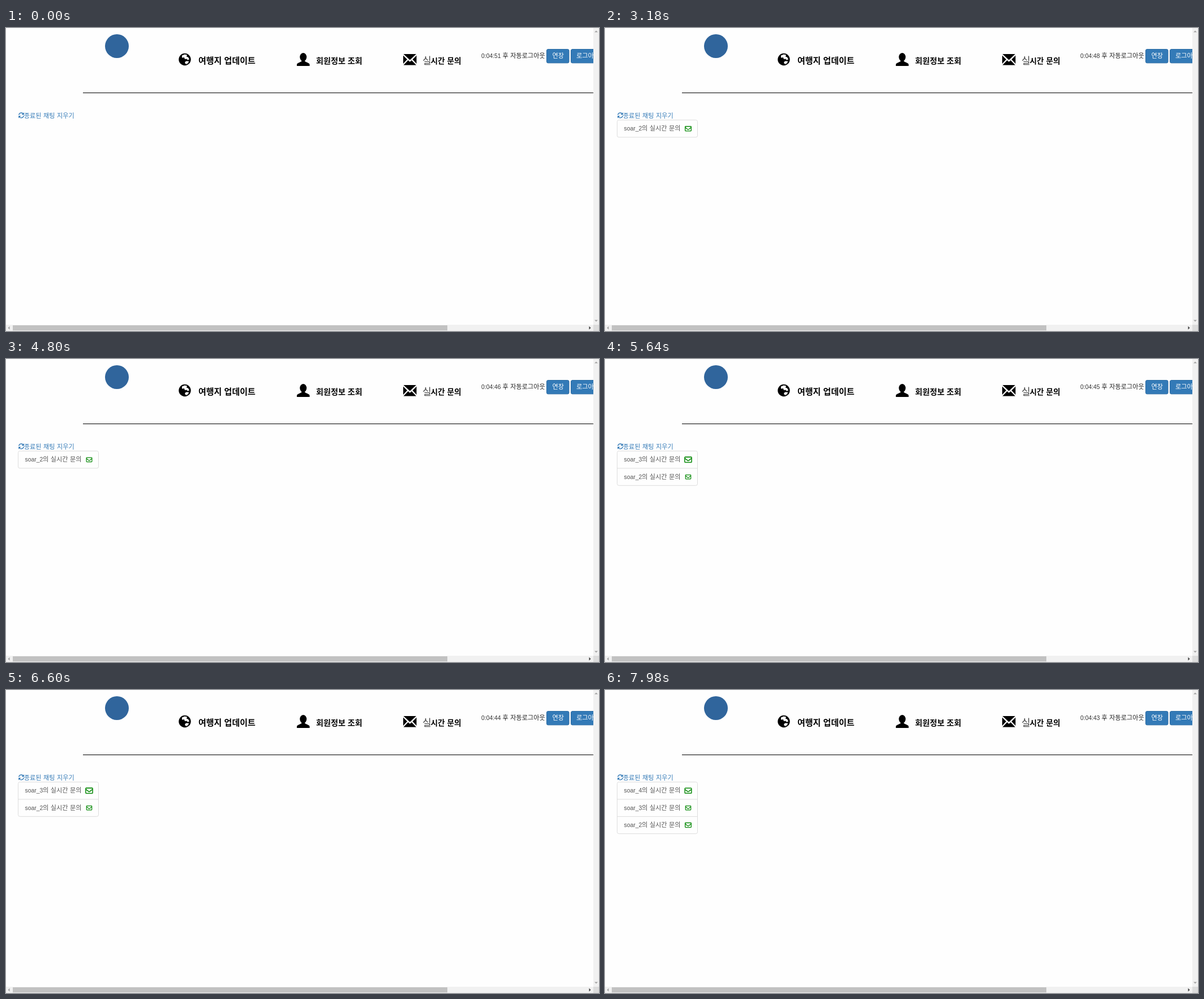
Write an HTML page that moves like this. It is 1048 by 535 pixels and loops after 8000 ms.

```html
<!DOCTYPE html>
<html lang="ko">
<head>
<meta charset="utf-8">
<style>
  html, body { margin: 0; width: 100%; height: 100%; overflow: hidden; background: #fefefe; }
  svg { display: block; }
  text { font: 10.36px "Liberation Sans", Arial, sans-serif; fill: #333; white-space: pre; }
  .ko { font: 11.15px "Noto Sans CJK KR", "Noto Sans CJK", sans-serif; word-spacing: .36px; }
  .menu { font: 700 14.5px "Noto Sans CJK KR", "Noto Sans CJK", sans-serif; fill: #000; }
  .brush { font-weight: 400; font-size: 17px; fill: #444; }
  .strong { font-weight: 500; fill: #222; }
  .white { fill: #fff; }
  .link { fill: #337ab7; }
  .room text { fill: #555; }
  .button { fill: #337ab7; stroke: #2e6da4; }
  .mail { fill: none; stroke: #0a8a0a; stroke-width: 1.2; stroke-linejoin: round; }
</style>
</head>
<body>
<svg width="1048" height="535" viewBox="0 0 1048 535">
  <rect width="1048" height="535" fill="#fefefe"/>
  <circle cx="196" cy="32" r="21" fill="#30659c"/>

  <!-- menu -->
  <circle cx="316" cy="55.5" r="10.7"/>
  <path fill="#fefefe" d="M311 48.500l5-2 4 1-1 3 3 1 2 4-3 1-2-2-3 .5-1-3-4 .5zM318 58.500h5l-1 3.500-4 2-2-3z"/>
  <text class="menu" x="340" y="63" style="font-size:15px">여행지 업데이트</text>

  <ellipse cx="525.300" cy="51.300" rx="6" ry="7.300"/>
  <path d="M514 67v-2.500q0-2 3-3l5.300-2.500V55h6v4l5.300 2.500q3 1 3 3V67z"/>
  <text class="menu" x="548" y="63" style="font-size:14.100px">회원정보 조회</text>

  <path d="M702.500 46h22.500l-11.200 10.500zM702 48.500l7 7-7 7.500zM725.500 48.500l-7 7 7 7.500zM702.500 65.500l8.200-8.500 3.100 2.700 3.100-2.700 8.100 8.500z"/>
  <text class="menu brush" x="736" y="63.500">실</text>
  <text class="menu" x="750.500" y="63" style="font-size:13.700px">시간 문의</text>

  <text id="clock" x="840" y="52.500"></text>
  <text class="ko strong" x="877.500" y="52.500">후 자동로그아웃</text>
  <rect class="button" x="955.500" y="37.500" width="39.500" height="24.300" rx="2.500"/>
  <text class="ko white" x="965.500" y="53.300">연장</text>
  <rect class="button" x="998.500" y="37.500" width="60" height="24.300" rx="2.500"/>
  <text class="ko white" x="1008" y="53.300">로그아웃</text>
  <path d="M136 114.500H1038" stroke="#000"/>

  <!-- sidebar -->
  <g stroke="#337ab7" stroke-width="1.400" fill="none">
    <path d="M22.800 153.500a4.200 4.200 0 0 1 7.600-2M31.200 154.800a4.200 4.200 0 0 1-7.600 2"/>
    <path class="link" stroke="none" d="M31.800 149v4.200h-4.200zM22.200 159.300v-4.200h4.200z"/>
  </g>
  <text class="ko link" x="31.800" y="158.600">종료된 채팅 지우기</text>
  <rect id="frame" x="21.500" y="162.500" width="142" rx="3" fill="#fefefe" stroke="#ddd"/>
  <g id="rooms"></g>

  <!-- scrollbars -->
  <path d="M1038 0h10v535H0V524h1038z" fill="#f1f1f1"/>
  <rect x="1038" y="524" width="10" height="11" fill="#dcdcdc"/>
  <rect x="12" y="525" width="768" height="9" fill="#c1c1c1"/>
  <path d="M6.500 526.500v6l-3-3zM1040 7.500h6l-3-3zM1040 515.500h6l-3 3z" fill="#a3a3a3"/>
  <path d="M1030.500 526.500v6l3-3z" fill="#404040"/>
</svg>
<script>
const LOOP = 8000, STEP = 60, BEAT = 960, ROW = 30.4;
const ticks = [660, 1620, 2520, 3480, 4440, 5400, 6360, 7320];
const rooms = [
  { name: "soar_2", added: 2850 },
  { name: "soar_3", added: 5220 },
  { name: "soar_4", added: 7500 },
];
const $ = id => document.getElementById(id);

$("rooms").innerHTML = rooms.map(({ name }) => `
  <g class="room">
    <path class="divider" d="M22 193H163" stroke="#ddd"/>
    <text x="33.500" y="181.300">${name}</text>
    <text class="ko" x="65" y="181.300">의 실시간 문의</text>
    <g class="mail"><rect x="-4.700" y="-3.600" width="9.400" height="7.200" rx=".7"/>
      <path d="M-4.700-2L-.8 1.100Q0 1.600 .8 1.100L4.700-2"/></g>
  </g>`).join("");
const rows = [...document.querySelectorAll(".room")];

// Double heartbeat followed by a rest; each segment eases in and out.
function heartbeat(phase) {
  const stops = [[0, 1], [.14, 1.3], [.28, 1], [.42, 1.3], [.7, 1], [1, 1]];
  const next = stops.findIndex(([at]) => phase < at);
  const [from, a] = stops[next - 1], [to, b] = stops[next];
  const u = (phase - from) / (to - from);
  return a + (b - a) * (1 - Math.cos(Math.PI * u)) / 2;
}

function draw(now) {
  const t = Math.floor(now % LOOP / STEP) * STEP;
  $("clock").textContent = "0:04:" + (51 - ticks.filter(tick => t >= tick).length);

  const count = rooms.filter(room => t >= room.added).length;
  $("frame").style.display = count ? "" : "none";
  $("frame").setAttribute("height", count * ROW);
  rows.forEach((row, i) => {
    const slot = count - 1 - i;
    row.style.display = slot < 0 ? "none" : "";
    if (slot < 0) return;
    row.setAttribute("transform", `translate(0 ${slot * ROW})`);
    row.querySelector(".divider").style.display = i ? "" : "none";
    const scale = heartbeat((t - rooms[i].added) % BEAT / BEAT);
    row.querySelector(".mail").setAttribute("transform", `translate(147 177.800) scale(${scale})`);
  });
}

const start = performance.now();
function frame() {
  draw(performance.now() - start);
  requestAnimationFrame(frame);
}
frame();
</script>
</body>
</html>
```
